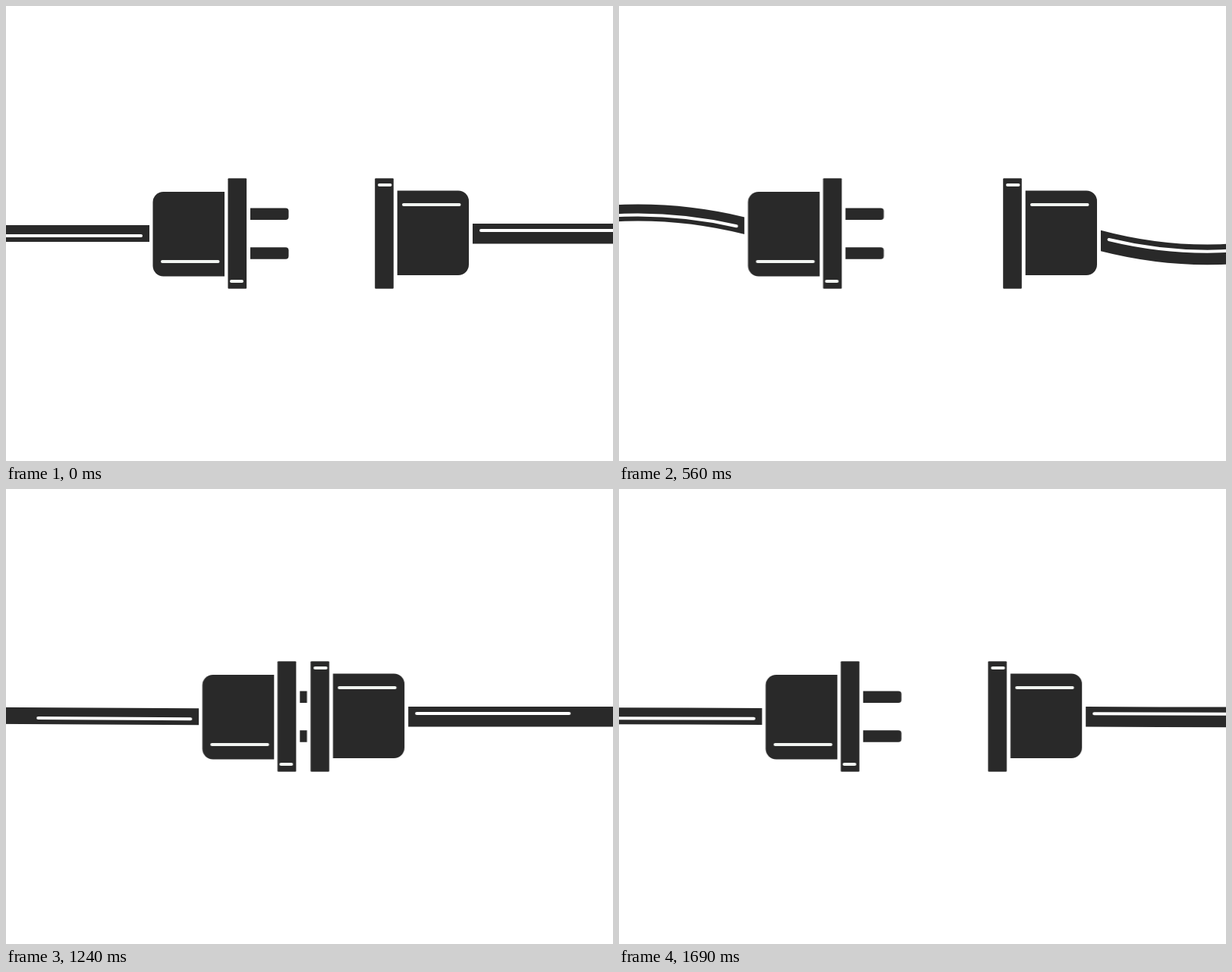
An HTML page without scripts that plays this animation: 800x600 px, repeating every 1.72 s.

```html
<!DOCTYPE html>
<html lang="en">
<head>
<meta charset="utf-8">
<title>Plug and socket</title>
<style>
  html, body { margin: 0; width: 100%; height: 100%; overflow: hidden; background: #fff; }
  svg { display: block; width: 100%; height: 100%; fill: #292929; }

  .plug, .socket, .cord-l, .cord-r { animation: 1.72s steps(1) -4ms infinite; }
  .plug { animation-name: plug; }
  .socket { animation-name: socket; }
  .cord-l { animation-name: bend-l; }
  .cord-r { animation-name: bend-r; }

  .cord { fill: none; stroke: #292929; }
  .glint { fill: none; stroke: #fff; stroke-width: 4; stroke-dasharray: 201 200; stroke-dashoffset: -67; stroke-linecap: round; }
  .shine { stroke: #f1f4f1; stroke-width: 4; stroke-linecap: round; }

  /* wind up, snap together, hold, pull apart, settle */
  @keyframes plug {
    0% { transform: none; }
    11.628% { transform: translateX(0); animation-timing-function: steps(3); }
    16.86% { transform: translateX(-1.7px); animation-timing-function: steps(4); }
    23.837% { transform: translateX(-11.5px); animation-timing-function: steps(3); }
    29.07% { transform: translateX(-20px); animation-timing-function: steps(2); }
    32.558% { transform: translateX(-23.5px); animation-timing-function: steps(6); }
    43.023% { transform: translateX(78px); }
    44.767%, 70.349% { transform: translateX(79.3px); }
    72.093% { transform: translateX(65.3px); animation-timing-function: steps(6); }
    82.558% { transform: translateX(-20.5px); animation-timing-function: steps(3); }
    87.791% { transform: translateX(-15.5px); animation-timing-function: steps(3); }
    93.023% { transform: translateX(-5.5px); animation-timing-function: steps(3); }
    98.256% { transform: translateX(-.3px); }
    100% { transform: none; }
  }
  @keyframes socket {
    0% { transform: none; }
    11.628% { transform: translateX(0); animation-timing-function: steps(3); }
    16.86% { transform: translateX(1.5px); animation-timing-function: steps(4); }
    23.837% { transform: translateX(10px); animation-timing-function: steps(3); }
    29.07% { transform: translateX(17px); animation-timing-function: steps(2); }
    32.558% { transform: translateX(20px); animation-timing-function: steps(6); }
    43.023% { transform: translateX(-83.8px); }
    44.767% { transform: translateX(-84.8px); }
    72.093% { transform: translateX(-84.8px); animation-timing-function: steps(6); }
    82.558% { transform: translateX(20px); animation-timing-function: steps(3); }
    87.791% { transform: translateX(14.8px); animation-timing-function: steps(3); }
    93.023% { transform: translateX(5px); animation-timing-function: steps(3); }
    98.256% { transform: translateX(.2px); }
    100% { transform: none; }
  }
  @keyframes bend-l {
    0%, 43.023%, 70.349%, 100% { d: path("M-90 300Q55 300 200 300"); }
    11.628% { d: path("M-90 300Q55 300 200 300"); animation-timing-function: steps(7); }
    23.837% { d: path("M-90 288.2Q55 267 200 296.3"); animation-timing-function: steps(5); }
    32.558% { d: path("M-90 289.2Q55 254.3 200 292.5"); animation-timing-function: steps(6); }
    72.093% { d: path("M-90 298.7Q55 299.2 200 300.4"); animation-timing-function: steps(6); }
    82.558% { d: path("M-90 289.2Q55 254.3 200 292.5"); animation-timing-function: steps(9); }
    98.256% { d: path("M-90 299.4Q55 299 200 300"); }
  }
  @keyframes bend-r {
    0%, 43.023%, 100% { d: path("M894 300.2Q749 300.2 604 300.2"); }
    11.628% { d: path("M894 300.2Q749 300.2 604 300.2"); animation-timing-function: steps(7); }
    23.837% { d: path("M894 312Q749 333.5 604 303.7"); animation-timing-function: steps(5); }
    32.558% { d: path("M894 310Q749 347.4 604 306.5"); animation-timing-function: steps(6); }
    72.093% { d: path("M894 300.2Q749 300.2 604 300.2"); animation-timing-function: steps(6); }
    82.558% { d: path("M894 310Q749 347.4 604 306.5"); animation-timing-function: steps(9); }
    98.256% { d: path("M894 300.8Q749 301.2 604 300.2"); }
  }
</style>
</head>
<body>
<svg viewBox="0 0 800 600">
  <clipPath id="end-l"><rect x="-120" y="200" width="309" height="200"/></clipPath>
  <clipPath id="end-r"><rect x="615" y="200" width="309" height="200"/></clipPath>

  <g class="plug">
    <g clip-path="url(#end-l)">
      <path class="cord cord-l" stroke-width="22" d="M-90 300Q55 300 200 300"/>
      <path class="glint cord-l" pathLength="290" transform="translate(0 3)" d="M-90 300Q55 300 200 300"/>
    </g>
    <path d="M288 245V356.5H207.5a14 14 0 0 1-14-14V259a14 14 0 0 1 14-14z"/>
    <path class="shine" d="M206 337H279.5"/>
    <rect x="292.5" y="227.3" width="24.6" height="145.4" rx="1"/>
    <path class="shine" d="M297 363H311"/>
    <path id="prong" d="M322 266.5h46.5a4 4 0 0 1 4 4v7.5a4 4 0 0 1-4 4H322z"/>
    <use href="#prong" y="51.7"/>
  </g>

  <g class="socket">
    <rect x="481.5" y="222" width="128" height="156" fill="#fff"/>
    <g clip-path="url(#end-r)">
      <path class="cord cord-r" stroke-width="26.6" d="M894 300.2Q749 300.2 604 300.2"/>
      <path class="glint cord-r" pathLength="290" transform="translate(0 -4.2)" d="M894 300.2Q749 300.2 604 300.2"/>
    </g>
    <rect x="486.2" y="227.3" width="24.6" height="145.4" rx="1"/>
    <path class="shine" d="M492 236H506.5"/>
    <path d="M515.7 243.5H596a14 14 0 0 1 14 14V341a14 14 0 0 1-14 14H515.7z"/>
    <path class="shine" d="M524 262H597.5"/>
  </g>
</svg>
</body>
</html>
```
